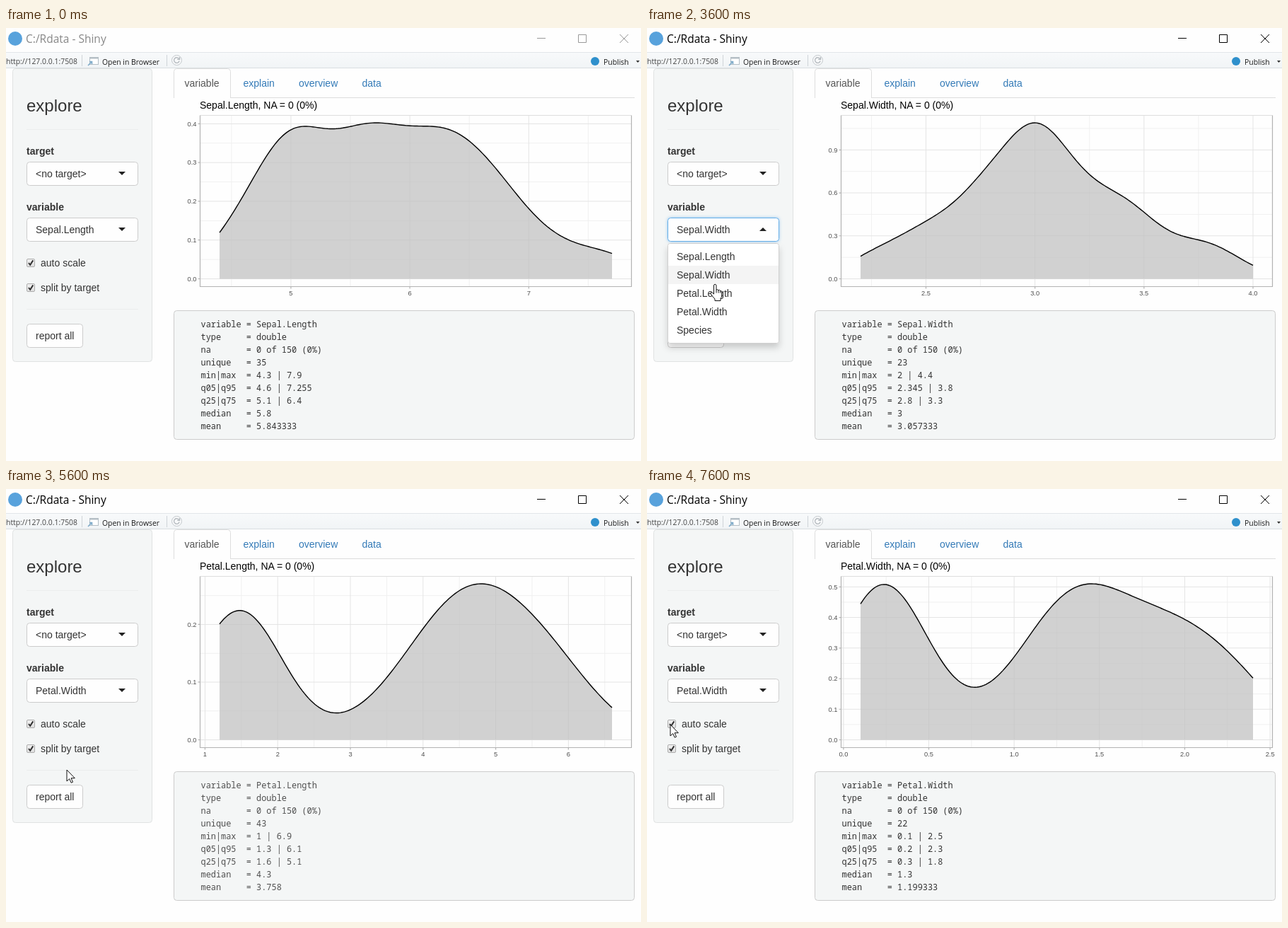
Recreate the animation shown at these times as an HTML page. Size 898 px wide and 612 px high, loop 7990 ms.

```html
<!DOCTYPE html>
<html lang="en">
<head>
<meta charset="utf-8">
<title>Explore</title>
<style>
html, body { margin: 0; width: 100%; height: 100%; overflow: hidden; background: #fefefe; }
svg { display: block; width: 898px; height: 612px; }
text { font-family: "Liberation Sans", Arial, sans-serif; font-size: 14px; fill: #333; white-space: pre; }
.ui { font-family: "Open Sans", "Noto Sans", sans-serif; font-size: 10.4px; fill: #1a1a1a; }
.mono { font-family: "Noto Sans Mono", "DejaVu Sans Mono", monospace; font-size: 11.92px; }
.axis { font-size: 9.3px; fill: #4d4d4d; }
.link { fill: #337ab7; }
.box { fill: #fefefe; stroke: #ccc; }
</style>
</head>
<body>
<svg viewBox="0 0 898 612" xmlns="http://www.w3.org/2000/svg">
  <defs>
    <filter id="shadow" x="-20%" y="-20%" width="140%" height="150%">
      <feDropShadow dx="0" dy="6" stdDeviation="5" flood-opacity=".175"/>
    </filter>
    <filter id="glow" x="-10%" y="-40%" width="120%" height="180%">
      <feDropShadow dx="0" dy="0" stdDeviation="2" flood-color="#66afe9" flood-opacity=".7"/>
    </filter>
    <linearGradient id="bar" x2="0" y2="1"><stop stop-color="#f8fafb"/><stop offset="1" stop-color="#f1f4f6"/></linearGradient>
    <linearGradient id="tick" x2="0" y2="1"><stop stop-color="#f2f2f2"/><stop offset="1" stop-color="#dedede"/></linearGradient>
  </defs>
  <rect width="898" height="612" fill="#fefefe"/>

  <g id="titlebar">
    <circle cx="13" cy="15" r="10" fill="#58a2dc"/>
    <text id="caption" class="ui" x="28" y="21" style="font-size:15.5px">C:/Rdata - Shiny</text>
    <path id="controls" d="M751 14.5h12M809.5 9.5h11v11h-11zM868 9l12 12M880 9l-12 12" fill="none"/>
  </g>

  <g id="toolbar">
    <rect y="34" width="898" height="23" fill="url(#bar)"/>
    <path d="M0 34.5H898" stroke="#e2e6e9"/>
    <path d="M0 56.5H898" stroke="#d9dee1"/>
    <path d="M107.5 38V54M227.5 38V54" stroke="#cfd4d8"/>
    <text class="ui" x="0" y="51" style="fill:#444">http://127.0.0.1:7508</text>
    <rect x="118.5" y="41.5" width="12" height="10" fill="#fff" stroke="#b4bec5"/>
    <path d="M118 42.5h13" stroke="#b4bec5" stroke-width="2"/>
    <path d="M116 53l5-5M118 47.5h3.5V51" fill="none" stroke="#7fabc9" stroke-width="1.6"/>
    <text class="ui" x="136" y="52">Open in Browser</text>
    <circle cx="241.5" cy="45.5" r="7" fill="#f8f9fa" stroke="#c3c8cc"/>
    <path d="M244.6 43.5a3.8 3.8 0 1 0 .5 3M245.5 41v3.3h-3.3" fill="none" stroke="#b2b8bd" stroke-width="1.3"/>
    <circle cx="833" cy="47" r="6" fill="#2f90cc"/>
    <text class="ui" x="845" y="52">Publish</text>
    <path d="M891 46h5l-2.5 3z" fill="#333"/>
  </g>

  <g id="sidebar">
    <rect x="9.5" y="57.5" width="197" height="414" rx="4" fill="#f4f6f6" stroke="#e0e2e2"/>
    <text x="29" y="118" style="font-size:24px">explore</text>
    <path d="M29 143.5H187M29 397.5H187" stroke="#ebeded"/>
    <text x="29" y="179" font-weight="bold">target</text>
    <rect class="box" x="29.5" y="189.5" width="157" height="33" rx="4"/>
    <text x="42" y="211">&lt;no target&gt;</text>
    <path d="M159 203h10l-5 5z" fill="#222"/>
    <text x="29" y="258" font-weight="bold">variable</text>
    <rect id="select" class="box" x="29.5" y="268.5" width="157" height="33" rx="4"/>
    <text id="value" x="42" y="290"></text>
    <path id="arrow" fill="#222"/>
    <path id="caret" stroke="#222"/>
    <g id="boxes"></g>
    <text x="49" y="337">auto scale</text>
    <text x="49" y="372">split by target</text>
    <rect class="box" x="29.5" y="418.5" width="79" height="33" rx="4"/>
    <text x="42" y="440">report all</text>
  </g>

  <g id="tabs">
    <path d="M237 98.5H889" stroke="#ddd"/>
    <path d="M237.5 99V61.5q0-4 4-4h72q4 0 4 4V99" fill="#fefefe" stroke="#ddd"/>
    <text x="252.5" y="83" style="fill:#555">variable</text>
    <text class="link" x="335.5" y="83">explain</text>
    <text class="link" x="414" y="83">overview</text>
    <text class="link" x="503.5" y="83">data</text>
  </g>

  <g id="plot"></g>
  <rect x="237.5" y="399.5" width="651" height="182" rx="4" fill="#f4f6f6" stroke="#ccc"/>
  <g id="stats"></g>

  <g id="menu">
    <rect x="29.5" y="304.5" width="157" height="141" rx="3" fill="#fff" stroke="#d0d0d0" filter="url(#shadow)"/>
    <rect id="hover" x="30" width="156" height="26" fill="#f4f4f4"/>
    <g id="options"></g>
  </g>

  <g id="cursor" stroke="#111" stroke-linejoin="round">
    <path id="pointer" fill="#fff" d="M0 0V16L3.7 12.6L6.2 18.2L8.5 17.2L6.1 11.7H11.3Z"/>
    <g id="hand" fill="#fff">
      <path d="M-1.5 14V2Q-1.5 .3 .2 .3T2 2V8Q3.6 7 5 8.6Q6.8 7.6 7.7 9.4Q9.4 9 9.7 11V16Q9.7 18.8 8 20.5V23.5H0V21Q-4 17 -6.2 13Q-6 11 -4 11.7Z"/>
      <path d="M2 8V12.5M5 8.6V12.5M7.7 9.4V12.5" fill="none"/>
    </g>
    <path id="beam" fill="none" d="M-3.5 -8H-.7L0 -7.3L.7 -8H3.5M0 -7.5V7.5M-3.5 8H-.7L0 7.3L.7 8H3.5"/>
  </g>
  <circle id="click" r="16" fill="#ff0"/>
</svg>

<script>
const LOOP = 7990, STEP = 80;
const $ = id => document.getElementById(id);
const show = (id, on) => $(id).setAttribute("display", on ? "inline" : "none");
const names = ["Sepal.Length", "Sepal.Width", "Petal.Length", "Petal.Width", "Species"];

// Counts per 0.1 bin, starting at min.
const petalWidth = [5, 29, 7, 7, 1, 1, 0, 0, 0, 7, 3, 5, 13, 8, 12, 4, 2, 12, 5, 6, 6, 3, 8, 3];
const plots = [
  { name: 0, min: 4.4, dx: 1, dy: .1,
    counts: [3, 1, 4, 2, 5, 6, 10, 9, 4, 1, 6, 7, 6, 8, 7, 3, 6, 6, 4, 9, 7, 5, 2, 8, 3, 4, 1, 1, 3, 1, 1, 0, 1, 4] },
  { name: 1, min: 2.2, dx: .5, dy: .3,
    counts: [3, 4, 3, 8, 5, 9, 14, 10, 26, 11, 13, 6, 12, 6, 4, 3, 6, 2, 1] },
  { name: 2, min: 1.2, dx: 1, dy: .1,
    counts: [2, 7, 13, 13, 7, 4, 0, 2, ...Array(10).fill(0), 1, 0, 0, 2, 0, 2, 1, 1, 1, 3, 5, 3, 4, 2, 4,
      8, 3, 5, 4, 5, 4, 8, 2, 2, 2, 3, 6, 3, 3, 2, 2, 3, 0, 1, 1, 0, 1] },
  { name: 3, min: .1, dx: .5, dy: .1, counts: petalWidth },
  { name: 3, min: .1, dx: .5, dy: .1, counts: [...petalWidth, 3] }
];
const summaries = [
  ["35", "4.3 | 7.9", "4.6 | 7.255", "5.1 | 6.4", "5.8", "5.843333"],
  ["23", "2 | 4.4", "2.345 | 3.8", "2.8 | 3.3", "3", "3.057333"],
  ["43", "1 | 6.9", "1.3 | 6.1", "1.6 | 5.1", "4.3", "3.758"],
  ["22", "0.1 | 2.5", "0.2 | 2.3", "0.3 | 1.8", "1.3", "1.199333"]
];
const keys = ["variable", "type", "na", "unique", "min|max", "q05|q95", "q25|q75", "median", "mean"];

// Gaussian kernel density with the usual rule-of-thumb bandwidth.
function density({ min, counts }) {
  const data = counts.flatMap((c, i) => Array(c).fill(min + i / 10));
  const n = data.length, mean = data.reduce((a, b) => a + b) / n;
  const sd = Math.sqrt(data.reduce((s, v) => s + (v - mean) ** 2, 0) / (n - 1));
  const quantile = p => {
    const h = (n - 1) * p, i = Math.floor(h);
    return data[i] + (h - i) * (data[i + 1] - data[i]);
  };
  const bw = .9 * Math.min(sd, (quantile(.75) - quantile(.25)) / 1.34) * n ** -.2;
  return x => data.reduce((s, v) => s + Math.exp(-.5 * ((x - v) / bw) ** 2), 0) / (n * bw * Math.sqrt(2 * Math.PI));
}

function drawPlot(plot) {
  const left = 302, right = 857, base = 354.5, height = 220.5, samples = 185;
  const [x0, x1, y0, y1] = [274.5, 884.5, 123.5, 365.5];
  const f = density(plot), span = (plot.counts.length - 1) / 10;
  const values = Array.from({ length: samples + 1 }, (_, i) => f(plot.min + span * i / samples));
  const top = Math.max(...values);
  const px = v => left + (v - plot.min) / span * (right - left);
  const py = v => base - v / top * height;
  const line = values.map((v, i) => `${(left + (right - left) * i / samples).toFixed(1)} ${py(v).toFixed(2)}`).join("L");
  let minor = "", major = "", ticks = "", labels = "";
  for (let i = 0; i < 40; i++) {
    const vx = i * plot.dx / 2, vy = i * plot.dy / 2, x = px(vx), y = py(vy);
    if (x > x0 && x < x1) {
      const d = `M${x} ${y0}V${y1}`;
      if (i % 2) minor += d;
      else {
        major += d;
        ticks += `M${x} ${y1}v3`;
        labels += `<text class="axis" x="${x}" y="378" text-anchor="middle">${vx.toFixed(plot.dx < 1 ? 1 : 0)}</text>`;
      }
    }
    if (y > y0) {
      const d = `M${x0} ${y}H${x1}`;
      if (i % 2) minor += d;
      else {
        major += d;
        ticks += `M${x0} ${y}h-3`;
        labels += `<text class="axis" x="269.5" y="${y + 3.3}" text-anchor="end">${vy.toFixed(1)}</text>`;
      }
    }
  }
  return `<text x="274" y="114" style="fill:#000">${names[plot.name]}, NA = 0 (0%)</text>
    <path d="${minor}" stroke="#f0f0f0"/><path d="${major}" stroke="#e4e4e4"/>
    <path d="M${left} ${base}L${line}V${base}Z" fill="#bfbfbf" fill-opacity=".7"/>
    <path d="M${line}" fill="none" stroke="#000" stroke-width="1.4"/>
    <path d="M${x0} ${y0}H${x1}" stroke="#dedede"/>
    <path d="M${x0} ${y0}V${y1}H${x1}V${y0}${ticks}" fill="none" stroke="#b3b3b3" stroke-width="1.2"/>${labels}`;
}

function drawStats(i) {
  const values = [names[i], "double", "0 of 150 (0%)", ...summaries[i]];
  return keys.map((key, row) =>
    `<text class="mono" x="275.5" y="${423 + 18 * row}">${key.padEnd(8)} = ${values[row]}</text>`).join("");
}

function drawCheckbox(y, on) {
  return `<rect x="29.5" y="${y - 5.5}" width="11" height="11" rx="1.5" fill="url(#tick)" stroke="#adadad"/>` +
    (on ? `<path d="M32 ${y}l2.2 2.8L38.3 ${y - 3.6}" fill="none" stroke="#333" stroke-width="2"/>` : "");
}

// Interface state, each entry overriding what came before.
const events = [
  [0, { active: false, open: 0, value: 0, plot: 0, hover: 0, auto: true, busy: false, click: false }],
  [1150, { active: true, open: 1150, click: true }],
  [1230, { click: false }],
  [1550, { hover: 1 }],
  [1940, { click: true }],
  [2020, { click: false, open: 0, value: 1, busy: true }],
  [2100, { plot: 1, busy: false }],
  [3040, { open: 3040, click: true }],
  [3120, { click: false }],
  [3680, { hover: 2 }],
  [3760, { click: true }],
  [3840, { click: false, open: 0, value: 2, busy: true }],
  [4000, { plot: 2, busy: false }],
  [4560, { open: 4560, click: true }],
  [4720, { click: false }],
  [5520, { hover: 3, click: true }],
  [5600, { click: false, open: 0, value: 3, busy: true }],
  [5760, { plot: 3, busy: false }],
  [6400, { click: true }],
  [6560, { click: false, auto: false, busy: true }],
  [6720, { plot: 4, busy: false }],
  [7280, { click: true }],
  [7440, { click: false, auto: true, busy: true }],
  [7600, { plot: 3, busy: false }]
];

// Cursor moves: first step, last step, destination.
const moves = [
  [440, 1000, 129, 280], [1150, 1710, 92, 346], [2410, 2730, 134, 291], [3280, 3680, 93, 368],
  [4080, 4480, 129, 295], [4880, 5360, 86, 397], [5840, 6240, 80, 336], [6320, 6400, 46, 335],
  [6720, 6720, 66, 337], [6800, 7120, 47, 331], [7280, 7280, 40, 330], [7520, 7600, 33, 333]
];

function cursorAt(t) {
  let x = 278, y = 509;
  for (const [start, end, tx, ty] of moves) {
    if (t < start) break;
    const steps = Math.round((end - start) / STEP) + 1;
    const u = Math.min(1, (Math.floor((t - start) / STEP) + 1) / steps);
    const ease = u * u * (3 - 2 * u);
    x += (tx - x) * ease;
    y += (ty - y) * ease;
  }
  return [x, y];
}

function cursorKind(x, y, open) {
  const within = (l, t, r, b) => x >= l && x <= r && y >= t && y <= b;
  if (within(29, 268, 187, 302)) return open ? "beam" : "hand";
  if (open) return within(29, 304, 187, 446) ? "hand" : "pointer";
  return within(41, 322, 187, 342) || within(41, 357, 187, 377) ? "hand" : "pointer";
}

const plotMarkup = plots.map(drawPlot), statMarkup = summaries.map((_, i) => drawStats(i));
$("options").innerHTML = names.map((n, i) => `<text x="42" y="${328 + 26 * i}">${n}</text>`).join("");

let shown = "";
function applyState(s) {
  const key = JSON.stringify(s);
  if (key === shown) return;
  shown = key;
  $("caption").style.fill = s.active ? "#000" : "#888";
  $("controls").setAttribute("stroke", s.active ? "#000" : "#999");
  $("value").textContent = names[s.value];
  $("select").style.stroke = s.open ? "#66afe9" : "";
  $("select").style.filter = s.open ? "url(#glow)" : "none";
  $("arrow").setAttribute("d", s.open ? "M159 287h10l-5-5z" : "M159 282h10l-5 5z");
  $("caret").setAttribute("d", `M${Math.round(42 + $("value").getComputedTextLength()) + 1.5} 277v14`);
  $("boxes").innerHTML = drawCheckbox(332, s.auto) + drawCheckbox(367, true);
  $("plot").innerHTML = plotMarkup[s.plot];
  $("stats").innerHTML = statMarkup[plots[s.plot].name];
  $("stats").setAttribute("opacity", s.busy ? .85 : 1);
  $("hover").setAttribute("y", 310 + 26 * s.hover);
  show("menu", s.open);
  show("click", s.click);
}

function render(t) {
  const s = Object.assign({}, ...events.filter(e => e[0] <= t).map(e => e[1]));
  applyState(s);
  show("caret", s.open && (t - s.open) % 1060 < 530);
  const [x, y] = cursorAt(t), kind = cursorKind(x, y, s.open);
  show("cursor", t >= 440);
  for (const k of ["pointer", "hand", "beam"]) show(k, k === kind);
  const place = `translate(${Math.round(x)} ${Math.round(y)})`;
  $("cursor").setAttribute("transform", place);
  $("click").setAttribute("transform", place);
}

const began = performance.now();
function frame() {
  render((performance.now() - began) % LOOP);
  requestAnimationFrame(frame);
}
frame();
</script>
</body>
</html>
```
